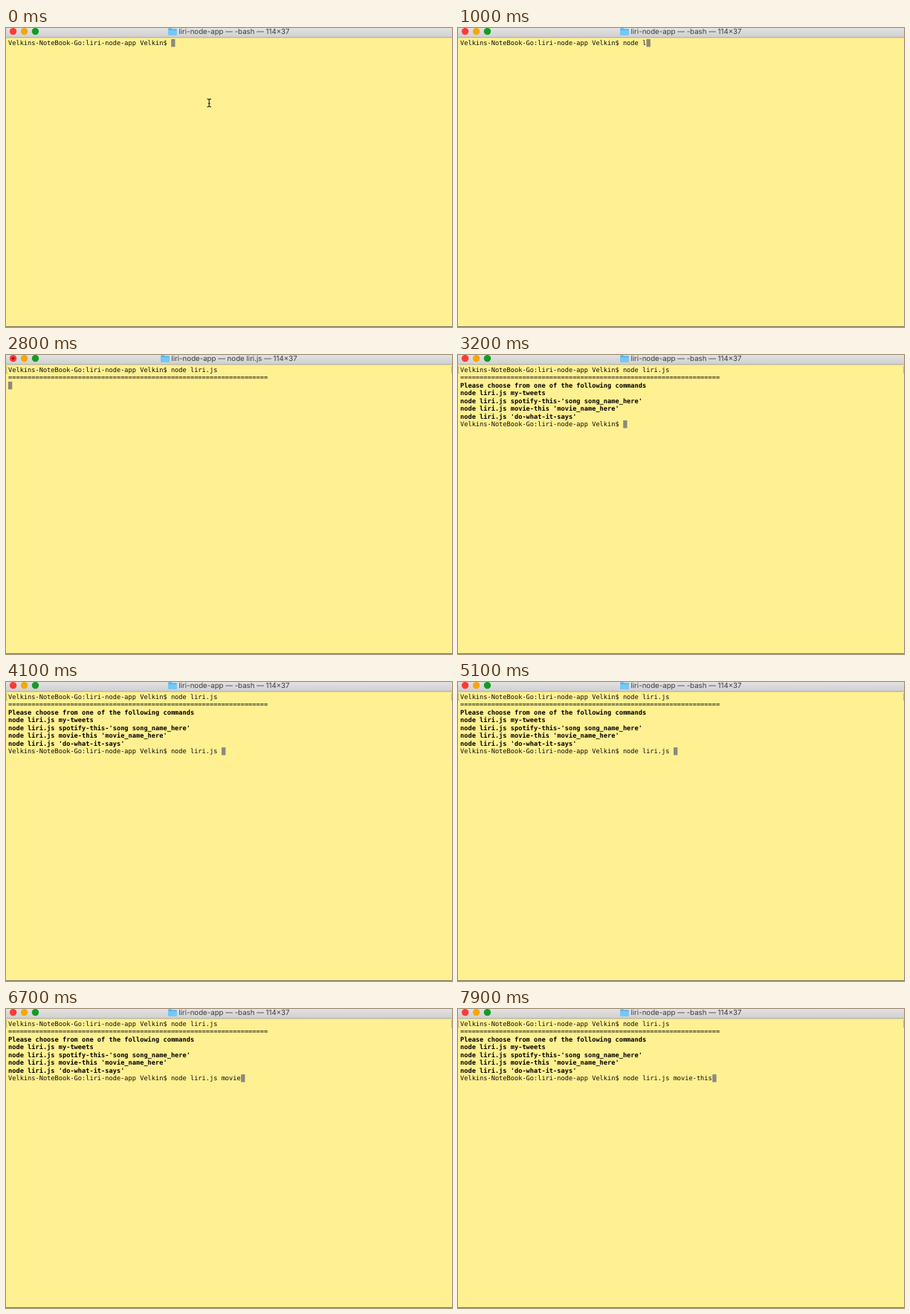
These frames come from a looping animation (600 px wide and 403 px high, 8000 ms). An HTML page:

```html
<!DOCTYPE html>
<html lang="en">
<head>
<meta charset="utf-8">
<title>Terminal</title>
<style>
  html, body { margin: 0; width: 100%; height: 100%; overflow: hidden; background: #fff092; }
  svg { display: block; width: 600px; height: 403px; }
  text { white-space: pre; text-rendering: geometricPrecision; }
  #rows text { font: 8.67px "DejaVu Sans Mono", monospace; fill: #0b0a05; }
  #rows text.bold { font-weight: bold; fill: #000; }
  #title { font: 9.7px Inter, sans-serif; fill: #3c3c3c; text-anchor: middle; }
</style>
</head>
<body>
<svg viewBox="0 0 600 403">
  <defs>
    <linearGradient id="bar" x2="0" y2="1">
      <stop stop-color="#e2e2e2"/>
      <stop offset="1" stop-color="#cfcfcf"/>
    </linearGradient>
  </defs>
  <rect width="600" height="403" fill="#fff092"/>
  <rect width="600" height="13" fill="url(#bar)"/>
  <rect y="12.4" width="600" height=".9" fill="#aaa79c"/>
  <rect y="402" width="600" height="1" fill="#77715a"/>
  <circle cx="9.6" cy="4.6" r="4.7" fill="#fc3b35"/>
  <circle id="busy" cx="9.6" cy="4.6" r="1.7" fill="#7c0d0a"/>
  <circle cx="24.6" cy="4.6" r="4.7" fill="#f4a70b"/>
  <circle cx="39.5" cy="4.6" r="4.7" fill="#139c22"/>
  <g id="folder">
    <path d="M0 1.2Q0 .2 1 .2H4L5.2 1.3H10.8Q11.8 1.3 11.8 2.3V8.5Q11.8 9.5 10.8 9.5H1Q0 9.5 0 8.5Z" fill="#58b4ea"/>
    <path d="M0 2.9H11.8V8.5Q11.8 9.5 10.8 9.5H1Q0 9.5 0 8.5Z" fill="#72c8f8"/>
  </g>
  <text id="title" x="307" y="8.2"></text>
  <path id="marks" d="M2 15.8H.6V24.4H2M598.8 15.8H599.6V24.4H598.8" fill="none" stroke="#a39b6c" stroke-width=".7"/>
  <rect id="cursor" width="5.3" height="10.4" fill="#8b8881"/>
  <g id="rows"></g>
  <path id="mouse" d="M270.6 95.6Q273.3 95.6 273.3 97.4Q273.3 95.6 276 95.6M273.3 97V105M270.6 106.4Q273.3 106.4 273.3 104.6Q273.3 106.4 276 106.4M271.8 101.8H274.8" fill="none" stroke="#2b2a20" stroke-width="1.1"/>
</svg>
<script>
const LOOP = 8000, LEFT = 3, CELL = 8.67 * 0.602, LINE = 10.45;
const PROMPT = "Velkins-NoteBook-Go:liri-node-app Velkin$ ";
const MENU = [
  "Please choose from one of the following commands",
  "node liri.js my-tweets",
  "node liri.js spotify-this-'song song_name_here'",
  "node liri.js movie-this 'movie_name_here'",
  "node liri.js 'do-what-it-says'"
];
const RUN = 2100, RULE = 2600, DONE = 3100, RECALL = 3900;

// Each entry: time of the change, text typed so far.
const firstCommand = [
  [300, "n"], [400, "no"], [500, "nod"], [600, "node"], [800, "node "],
  [1000, "node l"], [1100, "node li"], [1300, "node liri.js "]
];
const argument = [
  [5600, "m"], [5700, "mo"], [5800, "mov"], [6200, "movi"], [6400, "movie"],
  [6900, "movie-"], [7000, "movie-t"], [7200, "movie-th"],
  [7400, "movie-thi"], [7500, "movie-this"]
];

const el = id => document.getElementById(id);
const show = (id, on) => el(id).setAttribute("visibility", on ? "visible" : "hidden");
const typed = (keys, t) => keys.reduce((text, [at, value]) => t >= at ? value : text, "");

const rows = Array.from({ length: 8 }, (_, i) => {
  const row = document.createElementNS("http://www.w3.org/2000/svg", "text");
  row.setAttribute("x", LEFT);
  row.setAttribute("y", 23 + i * LINE);
  if (i >= 2 && i <= 6) row.setAttribute("class", "bold");
  return el("rows").appendChild(row);
});

function screen(t) {
  const lines = [PROMPT + typed(firstCommand, t)];
  if (t >= RULE) lines.push("=".repeat(67));
  if (t >= DONE) {
    const command = t >= RECALL ? "node liri.js " : "";
    lines.push(...MENU, PROMPT + command + typed(argument, t));
  } else if (t >= RUN) {
    lines.push("");
  }
  return lines;
}

function draw(t) {
  const lines = screen(t);
  const running = t >= RUN && t < DONE;
  rows.forEach((row, i) => {
    const text = lines[i] || "";
    if (row.textContent !== text) row.textContent = text;
  });
  const last = lines.length - 1;
  el("cursor").setAttribute("x", LEFT + lines[last].length * CELL);
  el("cursor").setAttribute("y", 15 + last * LINE);
  el("title").textContent = `liri-node-app — ${running ? "node liri.js" : "-bash"} — 114×37`;
  el("folder").setAttribute("transform", `translate(${running ? 208.3 : 218.2} 0)`);
  show("busy", running);
  show("marks", t >= 1600);
  show("mouse", t < 300);
}

const start = performance.now();
function tick(now) {
  draw(Math.max(0, now - start) % LOOP);
  requestAnimationFrame(tick);
}
draw(0);
requestAnimationFrame(tick);
</script>
</body>
</html>
```
